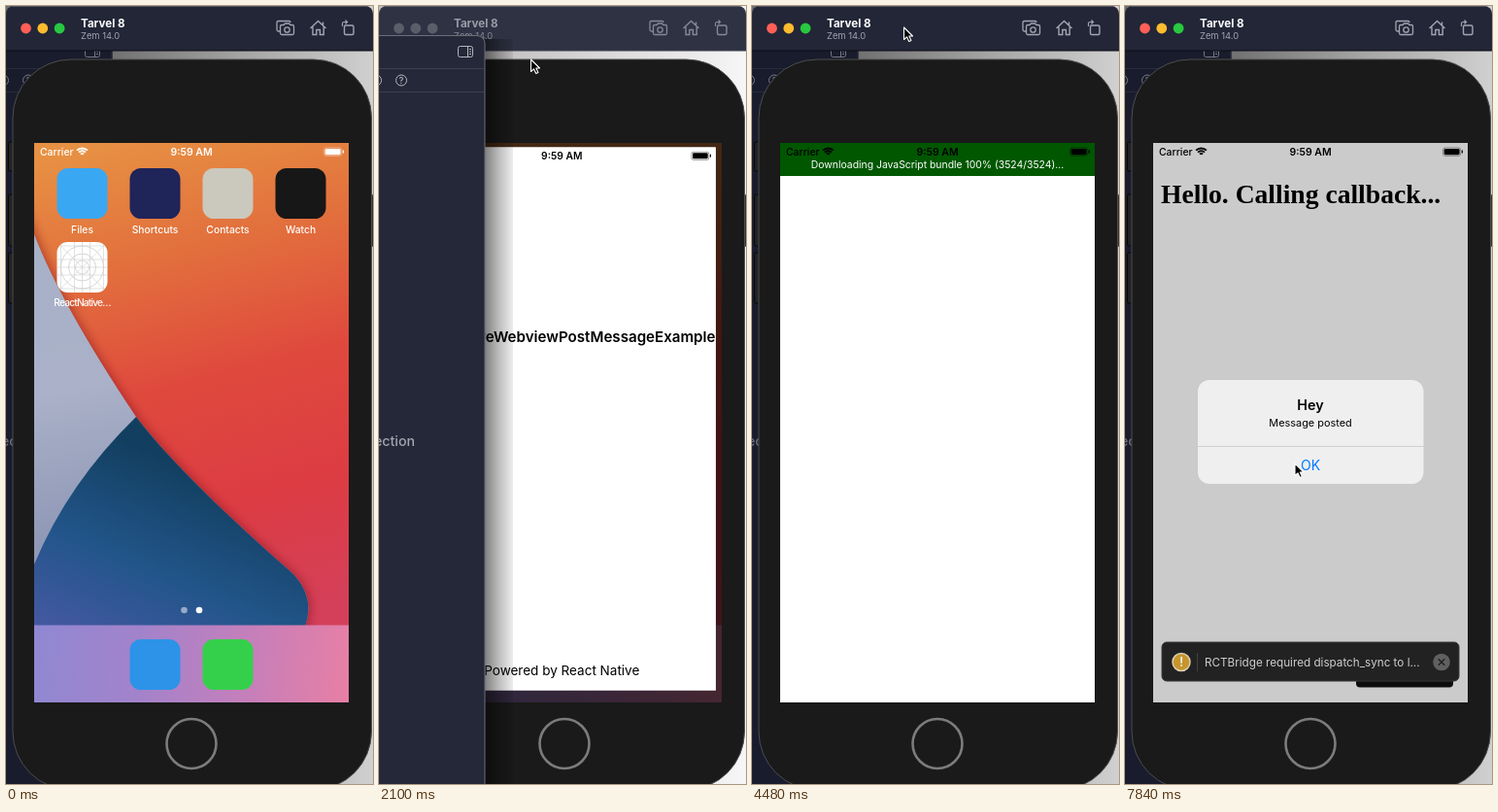
Animation of 378x801 px, one loop 8 s. Source, as an HTML page with a canvas:

```html
<!DOCTYPE html>
<html lang="en">
<head>
<meta charset="utf-8">
<title>Simulator app launch</title>
<style>
html, body { margin: 0; width: 100%; height: 100%; overflow: hidden; background: #1b1e2e; }
canvas { display: block; width: 378px; height: 801px; }
</style>
</head>
<body>
<canvas id="stage" width="378" height="801"></canvas>
<script>
const c = document.getElementById('stage').getContext('2d');
const LOOP = 8000, TAU = Math.PI * 2;
const SCREEN = { x: 29, y: 141, w: 324, h: 576 };
const SANS = 'Inter, sans-serif', SERIF = '"Liberation Serif", serif';

const clamp = v => Math.max(0, Math.min(1, v));
const span = (t, a, b) => clamp((t - a) / (b - a));
const ease = p => p * p * (3 - 2 * p);
const mix = (a, b, p) => a + (b - a) * p;
const settle = (t, start, rate) => t < start ? 0 : 1 - Math.exp((start - t) / rate);

function scope(draw) { c.save(); draw(); c.restore(); }

function text(s, x, y, size, color, weight = 400, align = 'left', family = SANS) {
  c.font = `${weight} ${size}px ${family}`;
  c.textAlign = align;
  c.fillStyle = color;
  c.fillText(s, x, y);
}

function rect(x, y, w, h, color) { c.fillStyle = color; c.fillRect(x, y, w, h); }

function round(x, y, w, h, r, fill, stroke) {
  c.beginPath();
  c.roundRect(x, y, w, h, r);
  if (fill) { c.fillStyle = fill; c.fill(); }
  if (stroke) { c.strokeStyle = stroke; c.stroke(); }
}

function circle(x, y, r, fill, stroke, width = 1) {
  c.beginPath();
  c.arc(x, y, r, 0, TAU);
  if (fill) { c.fillStyle = fill; c.fill(); }
  if (stroke) { c.strokeStyle = stroke; c.lineWidth = width; c.stroke(); }
}

function path(d, fill, stroke, width = 1) {
  const p = new Path2D(d);
  if (fill) { c.fillStyle = fill; c.fill(p); }
  if (stroke) { c.strokeStyle = stroke; c.lineWidth = width; c.stroke(p); }
}

function gradient(x0, y0, x1, y1, ...stops) {
  const g = c.createLinearGradient(x0, y0, x1, y1);
  stops.forEach((s, i) => g.addColorStop(i / (stops.length - 1), s));
  return g;
}

function desktop(simActive) {
  rect(0, 0, 378, 801, simActive
    ? gradient(105, 0, 378, 0, '#6f6f6f', '#a4a4a4', '#d0d0d0')
    : gradient(105, 0, 378, 0, '#c0bdbe', '#dcdadb', '#f6f6f6'));
}

function editor(front) {
  if (front) rect(109, 34, 29, 767,
    gradient(109, 0, 138, 0, 'rgba(0,0,0,.5)', 'rgba(0,0,0,.26)', 'rgba(0,0,0,.07)'));
  c.lineWidth = 1;
  round(-20, 30.5, 129, 790, 8, '#252838', front ? '#6c6e78' : '#3a3c48');
  rect(0, 64, 108, 1, '#3c3f4d');
  rect(0, 88, 108, 1, '#3c3f4d');
  round(81.5, 41.5, 15, 11, 2, null, '#b4b6be');
  path('M91.5 42v10M93 44.5h2M93 47h2M93 49.5h2', null, '#b4b6be');
  circle(-3, 76.5, 5.5, null, '#b4b6be');
  circle(23, 76.5, 5.5, null, '#b4b6be');
  text('?', 23, 79.5, 8.5, '#c4c6ce', 500, 'center');
  text('No Selection', 37, 453, 14.2, '#a3a6b0', 500, 'right');
  if (!front) rect(0, 30, 110, 771, 'rgba(5,7,20,.35)');
}

function device() {
  c.lineWidth = 1;
  for (const [y, h] of [[140, 30], [194, 53], [254, 52]]) round(2.5, y, 8, h, 1.5, '#222', '#080808');
  round(370, 194, 8, 54, 2, '#202020', '#444');
  round(7, 55, 369.5, 752, 60, '#1a1a1a', '#4d4d4f');
  circle(191, 759.5, 25.5, null, '#7c7c7c', 2.6);
}

function titleBar(active) {
  const ink = active ? '#a2a5b0' : '#858894';
  round(0, 0, 378, 46, [8, 8, 0, 0], active ? '#222637' : '#2f3243');
  rect(6, 0, 366, 1, active ? '#50535f' : '#5a5d69');
  rect(0, 45.5, 378, 1, active ? '#0c0d14' : '#3f4250');
  ['#ff5f57', '#febc2e', '#28c840'].forEach((color, i) =>
    circle(20.5 + 17.3 * i, 23, 5.4, active ? color : '#5b5e69'));
  text('Tarvel 8', 77, 21.5, 11.6, active ? '#fff' : '#9a9ca6', 700);
  text('Zem 14.0', 77, 33.5, 9.4, active ? '#a2a5b0' : '#858894');
  // screenshot, home and rotate buttons
  path('M282 26h-1.5q-1.5 0-1.5-1.5v-7.5q0-1.5 1.5-1.5h11q1.5 0 1.5 1.5', null, ink, 1.3);
  path('M284 19.5h2l1.5-1.5h4l1.5 1.5h2q1.5 0 1.5 1.5v7q0 1.5-1.5 1.5h-11q-1.5 0-1.5-1.5v-7q0-1.5 1.5-1.5z', null, ink, 1.3);
  circle(289.5, 24.5, 2.7, null, ink, 1.3);
  path('M313.5 23l8-7.5 8 7.5M316 21.5v8h3.8v-5h3.6v5h3.8v-8M326.5 19.5v-3', null, ink, 1.4);
  round(348.5, 20, 9.5, 9.5, 1.5, null, ink);
  path('M346.5 21v-3q0-1.5 1.5-1.5h3M349.5 14.5l2 2-2 2', null, ink, 1.2);
}

// Everything on the screen is laid out from the screen's own top left corner.
function statusBar(ink, carrier = true) {
  if (carrier) {
    text('Carrier', 6, 13, 10.4, ink, 500);
    c.lineCap = 'butt';
    for (const r of [2, 4.8, 7.6]) {
      c.beginPath();
      c.arc(49.5, 13, r, -Math.PI * .75, -Math.PI * .25);
      c.strokeStyle = ink;
      c.lineWidth = 2;
      c.stroke();
    }
  }
  text('9:59 AM', 162, 13, 10.5, ink, 600, 'center');
  c.lineWidth = .8;
  round(298.4, 4.9, 18.4, 8.4, 2.4, null, ink === '#fff' ? 'rgba(255,255,255,.45)' : 'rgba(0,0,0,.45)');
  round(299.6, 6, 16, 6.2, 1.4, ink);
  rect(317.7, 7.5, 1.2, 3, ink);
}

function wallpaper() {
  const sweep = 'M-20 40L0 94Q28 167 105 282C150 340 220 402 266 443Q290 468 279 498V600H-20z';
  rect(0, 0, 324, 576, gradient(60, 0, 190, 510, '#e79143', '#e26f3d', '#df493d', '#dc3c43', '#d4405a'));
  scope(() => {
    c.shadowColor = 'rgba(130,12,24,.55)';
    c.shadowBlur = 11;
    c.shadowOffsetX = 2;
    path(sweep, gradient(0, 110, 60, 400, '#a7b1c7', '#aab1c8', '#8f98b6'));
  });
  scope(() => {
    c.clip(new Path2D(sweep));
    path('M0 434Q35 350 105 282L324 200V576H0z',
      gradient(150, 330, 60, 540, '#123f60', '#22558a', '#4b59a6'));
  });
  rect(0, 496.5, 324, 80, gradient(0, 520, 324, 550, '#9088d2', '#a283cb', '#c47fbb', '#e77fa5'));
}

function templateIcon() {
  round(0, 0, 52, 52, 11, '#fff');
  scope(() => {
    c.clip();
    for (const r of [7, 14, 22]) circle(26, 26, r, null, '#c4c4c4', .7);
    path('M0 0L52 52M52 0L0 52M26 0V52M0 26H52M18 0V52M34 0V52M0 18H52M0 34H52M4 0V52M48 0V52M0 4H52M0 48H52',
      null, '#cdcdcd', .6);
  });
}

function icons(scale) {
  c.translate(162, 288);
  c.scale(scale, scale);
  c.translate(-162, -288);
  const apps = [['Files', '#3aa7f2'], ['Shortcuts', '#1f2459'], ['Contacts', '#cbc8bd'], ['Watch', '#171717']];
  apps.forEach(([name, color], i) => {
    const x = 23.5 + 75 * i;
    round(x, 26, 52, 52, 11.5, color);
    text(name, x + 26, 92.5, 10.3, '#fff', 500, 'center');
  });
  scope(() => { c.translate(23.5, 102); templateIcon(); });
  c.letterSpacing = '-.8px';
  text('ReactNative…', 49.5, 168, 10.2, '#fff', 500, 'center');
  c.letterSpacing = '0px';
  circle(154.5, 481, 3.3, 'rgba(255,255,255,.5)');
  circle(170, 481, 3.3, '#fff');
  round(98.5, 511, 52, 52, 11.5, '#2c93e8');
  round(173.5, 511, 52, 52, 11.5, '#35d04b');
}

function splash() {
  rect(0, 0, 324, 576, '#fff');
  text('ReactNativeWebviewPostMessageExample', 162, 205, 15.45, '#000', 600, 'center');
  text('Powered by React Native', 162, 555, 13.8, '#000', 400, 'center');
  statusBar('#000');
}

function launch(p) {
  const w = mix(52, 324, p), h = mix(52, 576, p ** 1.3);
  const x = mix(49.5, 162, p) - w / 2, y = mix(128, 288, p) - h / 2;
  scope(() => {
    round(x, y, w, h, Math.min(12 + 13 * p, 24 * (1 - p)), '#fff');
    c.clip();
    c.translate(x, y);
    scope(() => {
      c.globalAlpha = clamp(1 - p * 1.4);
      c.translate((w - h) / 2, 0);
      c.scale(h / 52, h / 52);
      templateIcon();
    });
    c.globalAlpha = clamp(p * 3);
    c.scale(w / 324, w / 324);
    c.globalCompositeOperation = 'multiply';
    splash();
  });
}

function home(t) {
  const p = settle(t, 1789, 84);
  wallpaper();
  scope(() => icons(1 - .03 * p));
  if (p) rect(0, 0, 324, 576, `rgba(0,0,0,${.72 * p})`);
  scope(() => {
    c.globalAlpha = clamp(2 - 2.1 * p);
    statusBar('#fff', p === 0);
  });
  if (p) launch(p);
}

function downloadBar(t) {
  const total = 3524, p = ease(span(t, 3850, 4400));
  c.globalAlpha = span(t, 3750, 3920) * (1 - span(t, 4600, 4760));
  rect(0, 0, 324, 34, '#005700');
  text(`Downloading JavaScript bundle ${Math.round(p * 100)}% (${Math.round(p * total)}/${total})...`,
    162, 25.5, 10.4, '#fff', 400, 'center');
}

function toast() {
  round(209, 520, 100, 40.5, 4, '#0e0e0e');
  c.lineWidth = 1;
  round(9, 514, 306, 40, 5, '#262626', '#3a3a3a');
  circle(29, 534.5, 9, '#dda52f', '#f3e6c4', 1.5);
  text('!', 29, 539, 12.5, '#fff', 700, 'center');
  rect(45, 525, 1, 19, '#484848');
  text('RCTBridge required dispatch_sync to l...', 53, 538.5, 11.7, '#e4e4e4');
  circle(297, 534.5, 8.8, '#6a6a6a');
  path('M293.8 531.3l6.4 6.4M300.2 531.3l-6.4 6.4', null, '#222', 1.3);
}

function alertBox(p) {
  const s = mix(1.2, 1, p);
  c.translate(162, 297);
  c.scale(s, s);
  c.translate(-162, -297);
  c.globalAlpha = p ** 4;
  round(46, 244, 232.5, 107, 12, '#efefef');
  rect(46, 312, 232.5, 1, '#cfcfcf');
  c.globalAlpha = p;
  text('Hey', 162, 274.5, 14.3, '#000', 600, 'center');
  text('Message posted', 162, 292, 10.9, '#000', 400, 'center');
  text('OK', 162, 337, 14, '#007aff', 400, 'center');
}

function app(t) {
  const p = settle(t, 5200, 75);
  rect(0, 0, 324, 576, '#fff');
  if (t < 4760) scope(() => downloadBar(t));
  if (t >= 4970) text('Hello. Calling callback...', 8, 62, 27.6, '#000', 700, 'left', SERIF);
  statusBar('#000');
  if (p) rect(0, 0, 324, 576, `rgba(0,0,0,${.205 * p})`);
  if (t >= 4690) toast();
  if (p) {
    round(9, 514, 306, 40, 5, `rgba(0,0,0,${.1 * p})`);
    scope(() => alertBox(p));
  }
}

function cursor(t) {
  if (t < 1840) return;
  const enter = ease(span(t, 1840, 2080)), up = ease(span(t, 2570, 2800)), down = ease(span(t, 6120, 7560));
  const x = mix(-20, 156.5, enter) + 18.5 * down;
  const y = mix(110, 55, enter) - 33 * up + 449 * down;
  scope(() => {
    c.translate(x, y);
    c.lineJoin = 'round';
    path('M0 0V12.5L3 9.8L5.2 14.5L7.4 13.5L5.3 9H9z', '#000', '#fff', 1.1);
  });
}

function draw(t) {
  const simActive = t < 770 || t >= 3150;
  desktop(simActive);
  if (simActive) editor(false);
  device();
  titleBar(simActive);
  scope(() => {
    c.beginPath();
    c.rect(SCREEN.x, SCREEN.y, SCREEN.w, SCREEN.h);
    c.clip();
    c.translate(SCREEN.x, SCREEN.y);
    if (t < 2520) home(t);
    else if (t < 3780) splash();
    else app(t);
  });
  if (!simActive) editor(true);
  cursor(t);
}

const start = performance.now();
function frame() {
  draw((performance.now() - start) % LOOP);
  requestAnimationFrame(frame);
}
frame();
</script>
</body>
</html>
```
